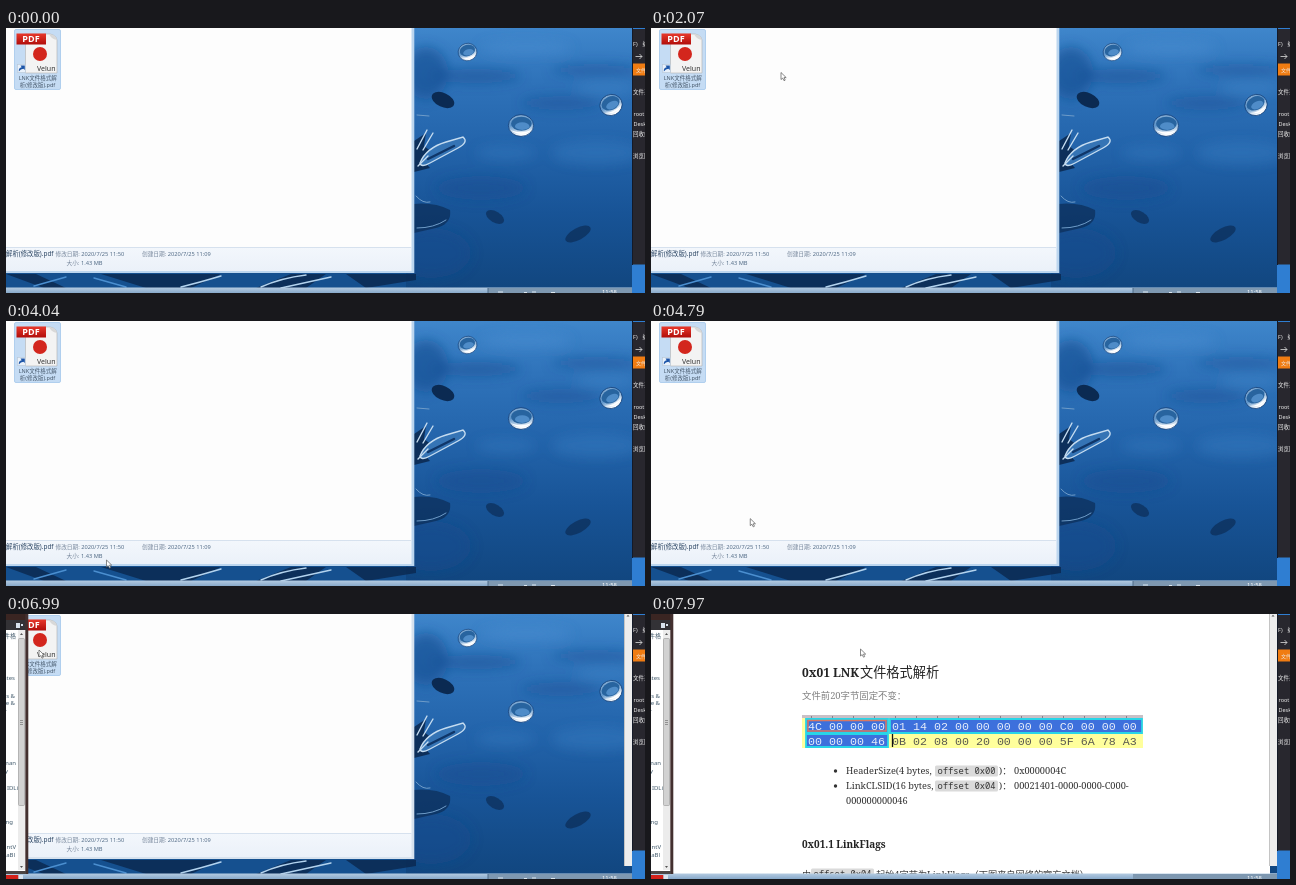
An HTML page that plays this animation: 639 px wide and 265 px high, repeating every 8000 ms.

```html
<!DOCTYPE html>
<html lang="zh-CN">
<head>
<meta charset="utf-8">
<style>
  html, body { margin: 0; width: 100%; height: 100%; overflow: hidden; background: #0c3a78 }
  svg { display: block; font-family: "Noto Sans", "Noto Sans CJK SC", "Noto Sans CJK", sans-serif }
  .serif { font-family: "Noto Serif", "Noto Sans CJK SC", "Noto Sans CJK", serif }
  .mono { font-family: "Noto Sans Mono", "DejaVu Sans Mono", monospace }
  .hex { font: 11.67px "Liberation Mono", monospace; white-space: pre }
</style>
</head>
<body>
<svg width="639" height="265" viewBox="0 0 639 265">
  <defs>
    <linearGradient id="sea" x2="0" y2="1">
      <stop offset="0" stop-color="#3f86cb"/><stop offset=".2" stop-color="#2f73ba"/>
      <stop offset=".45" stop-color="#2364ab"/><stop offset=".7" stop-color="#185497"/><stop offset="1" stop-color="#11467f"/>
    </linearGradient>
    <linearGradient id="drop" x2=".2" y2="1">
      <stop stop-color="#8fb2d4"/><stop offset=".5" stop-color="#5c93c9"/><stop offset="1" stop-color="#fff"/>
    </linearGradient>
    <linearGradient id="pane" x2="0" y2="1">
      <stop stop-color="#f3f7fc"/><stop offset="1" stop-color="#ebf1f9"/>
    </linearGradient>
    <linearGradient id="bar" x2="0" y2="1">
      <stop stop-color="#b5cce2"/><stop offset="1" stop-color="#88a9ca"/>
    </linearGradient>
    <linearGradient id="red" x2="0" y2="1">
      <stop stop-color="#e8392c"/><stop offset="1" stop-color="#b10d0a"/>
    </linearGradient>
    <filter id="soft" x="-50%" y="-80%" width="200%" height="260%"><feGaussianBlur stdDeviation="6"/></filter>
    <filter id="dim"><feGaussianBlur stdDeviation=".7"/></filter>
    <g id="bead">
      <ellipse rx="10.5" ry="9.7" fill="url(#drop)" stroke="#123f78" stroke-width=".7"/>
      <ellipse cx=".3" cy="-1.6" rx="8.6" ry="6.3" fill="#28649f"/>
      <ellipse cx="1" cy=".6" rx="6" ry="3.4" fill="#4f8cc8"/>
      <path d="M-9 4Q0 11 9 4Q0 8-9 4" fill="#fff"/>
    </g>
  </defs>

  <!-- desktop -->
  <rect width="639" height="265" fill="#15508f"/>
  <rect x="400" width="227" height="262" fill="url(#sea)"/>
  <g filter="url(#soft)">
    <g fill="#144b90">
      <ellipse cx="420" cy="45" rx="22" ry="26" opacity=".6"/>
      <ellipse cx="470" cy="48" rx="45" ry="7" opacity=".5"/>
      <ellipse cx="590" cy="42" rx="45" ry="6" opacity=".45"/>
      <ellipse cx="555" cy="75" rx="40" ry="7" opacity=".4"/>
      <ellipse cx="475" cy="160" rx="45" ry="12" opacity=".4"/>
      <ellipse cx="425" cy="225" rx="40" ry="25" opacity=".5"/>
    </g>
    <g fill="#4a90d2">
      <ellipse cx="520" cy="20" rx="45" ry="7" opacity=".5"/>
      <ellipse cx="600" cy="60" rx="30" ry="6" opacity=".35"/>
      <ellipse cx="590" cy="125" rx="45" ry="12" opacity=".25"/>
      <ellipse cx="500" cy="125" rx="30" ry="7" opacity=".25"/>
    </g>
  </g>
  <g fill="#0b2a52" filter="url(#dim)">
    <ellipse cx="437" cy="72" rx="12" ry="7" transform="rotate(25 437 72)"/>
    <ellipse cx="489" cy="189" rx="10" ry="5.5" transform="rotate(30 489 189)" opacity=".65"/>
    <ellipse cx="572" cy="206" rx="14" ry="6" transform="rotate(-28 572 206)" opacity=".65"/>
    <path d="M408 113L420 105L418 118L426 124L417 132L424 140L408 144Z" opacity=".9"/>
    <path d="M408 176Q428 174 444 182Q446 196 430 200L408 205Z" opacity=".65"/>
    <path d="M0 246L38 260H60L30 246ZM95 246L140 260H185L215 246ZM250 260L285 246H320L300 260ZM340 246H410V252L360 260Z" opacity=".85"/>
  </g>
  <g fill="none" stroke="#c5dcf0" stroke-width="1.4" stroke-linecap="round" filter="url(#dim)">
    <path d="M414 135Q420 120 440 114L457 109Q463 114 452 120L424 135Q415 140 414 135" fill="#3574b5"/>
    <path d="M422 131L448 118" stroke="#0f3668" stroke-width="2.5"/>
    <path d="M411 121L421 102M417 122L427 105M412 138L422 128"/>
    <path d="M410 168Q417 176 424 174M411 200Q428 200 440 192M411 87L423 88" stroke="#6f9cc8" stroke-width="1"/>
    <path d="M175 259Q195 254 215 248M255 259Q275 250 300 247M275 260L325 249" stroke="#b3d3ee"/>
    <path d="M28 258L60 249M88 250L120 259" stroke="#4b8fd0"/>
  </g>
  <use href="#bead" transform="translate(461.5 24) rotate(-15) scale(.9)"/>
  <use href="#bead" transform="translate(515 97.5) scale(1.2 1.12)"/>
  <use href="#bead" transform="translate(605 77) rotate(-25) scale(1.08)"/>

  <!-- taskbar -->
  <rect y="259.5" width="626" height="5.5" fill="url(#bar)"/>
  <path d="M482 260H626V265H482Z" fill="#7e98b1"/>
  <path d="M482 260V265" stroke="#4d6a88"/>
  <path d="M492 264H497M518 264.5H521M526 264H530M545 264.5H549" stroke="#dce7f0"/>
  <text x="596" y="265.9" font-size="5.8" fill="#fff">11:58</text>

  <!-- file window -->
  <rect id="frame" x="-5" y="-5" width="413.3" height="250" fill="#bcd6ef"/>
  <rect width="405.5" height="219.5" fill="#fdfdfd"/>
  <rect y="219" width="405.5" height="24" fill="url(#pane)"/>
  <path d="M0 219.5H405.5" stroke="#d6e1ee"/>
  <g id="details" font-size="5.7" fill="#75859a">
    <text y="228" font-size="6.4" fill="#2b4563">解析(修改版).pdf</text>
    <text x="49.5" y="228">修改日期: <tspan fill="#526b86">2020/7/25 11:50</tspan></text>
    <text x="136" y="228">创建日期: <tspan fill="#526b86">2020/7/25 11:09</tspan></text>
    <text x="60.5" y="236.5">大小: <tspan fill="#526b86">1.43 MB</tspan></text>
  </g>
  <rect id="mark" x="8.5" y="1.5" width="46" height="60" rx="1.5" fill="#c5dcf4" stroke="#b0cfee"/>
  <path d="M19.5 6H44Q50 7 51 12V45H19.5Z" fill="#f3f3f3" stroke="#b0b0b0" stroke-width=".6"/>
  <path d="M43 6Q45 11 51 12Q50 7 43 6" fill="#d8d8d8"/>
  <rect x="10.5" y="5.5" width="29.5" height="11" fill="url(#red)"/>
  <text x="25" y="14.2" font-size="9" font-weight="700" fill="#fff" text-anchor="middle">PDF</text>
  <circle cx="34" cy="26" r="7" fill="#d3261d"/>
  <text x="31" y="42.5" font-size="7" fill="#333">Velun</text>
  <rect x="11.5" y="36.5" width="8" height="8" fill="#e9f1fa" stroke="#b8c6d6" stroke-width=".6"/>
  <path d="M12.8 43.5Q12.5 39.7 15.7 39.3L14.5 37.5H18.8V42L17.4 40.8Q14.8 41 12.8 43.5" fill="#1c55a8"/>
  <g font-size="5.5" fill="#46586b" text-anchor="middle">
    <text x="31.7" y="51.5">LNK文件格式解</text>
    <text x="31.5" y="59">析(修改版).pdf</text>
  </g>

  <!-- reader window -->
  <g id="reader">
    <g id="page">
      <rect x="22" width="597" height="260" fill="#fff"/>
      <g class="serif" fill="#333">
        <g font-weight="600" fill="#222">
          <text x="151" y="62.5" font-size="12">0x01 LNK</text>
          <text x="209" y="62.5" font-size="13.2" font-weight="400">文件格式解析</text>
          <text x="151" y="233.5" font-size="10">0x01.1 LinkFlags</text>
        </g>
        <text x="151" y="84.5" font-size="9.4" fill="#808080">文件前20字节固定不变：</text>
        <rect x="151" y="101" width="341" height="33" fill="#ffff9c"/>
        <path d="M151 102.5H492" stroke="#c9c0c6" stroke-width="3"/>
        <path d="M160 103H490" stroke="#8a7f88" stroke-width="2" stroke-dasharray="1 20"/>
        <g fill="#3d70dc" stroke="#28d5e8" stroke-width="1.8">
          <path d="M155 105H237V119H155ZM239 105H491V119H239ZM155 120H237V133H155Z"/>
          <path d="M157 106.5H235V117H157Z" stroke="#d97862" stroke-width="1.5"/>
        </g>
        <g class="hex" fill="#e6edfa">
          <text x="157" y="116">4C 00 00 00 01 14 02 00 00 00 00 00 C0 00 00 00</text>
          <text x="157" y="130.5">00 00 00 46 <tspan fill="#5a5a50">0B 02 08 00 20 00 00 00 5F 6A 78 A3</tspan></text>
        </g>
        <path d="M241.5 120V133" stroke="#111" stroke-width="1.3"/>
        <g fill="#dadada">
          <rect x="284" y="151.5" width="63" height="11" rx="1.5"/>
          <rect x="284" y="166.5" width="63" height="11" rx="1.5"/>
          <rect x="160" y="254.5" width="63" height="11" rx="1.5"/>
        </g>
        <circle cx="184.5" cy="157" r="1.7"/><circle cx="184.5" cy="172" r="1.7"/>
        <g font-size="9.2">
          <text x="195" y="160.3">HeaderSize(4 bytes,</text>
          <text x="195" y="175.3">LinkCLSID(16 bytes,</text>
          <text x="348" y="160.3">)：</text><text x="363" y="160.3">0x0000004C</text>
          <text x="348" y="175.3">)：</text><text x="363" y="175.3">00021401-0000-0000-C000-</text>
          <text x="195" y="190.3">000000000046</text>
          <text x="151" y="263.5">由</text>
          <text x="225" y="263.5">起始4字节为LinkFlags（下图来自网络的官方文档）</text>
        </g>
        <g class="mono" font-size="8.8">
          <text x="286.5" y="160">offset 0x00</text>
          <text x="286.5" y="175">offset 0x04</text>
          <text x="162.5" y="263">offset 0x04</text>
        </g>
      </g>
      <rect x="22" y="259.5" width="604" height="5.5" fill="url(#bar)"/>
      <path d="M482 260H626V265H482Z" fill="#7e98b1"/>
      <text x="596" y="265.9" font-size="5.8" fill="#fff">11:58</text>
    </g>
    <rect width="20" height="260" fill="#fff"/>
    <rect width="22" height="16" fill="#333236"/>
    <rect width="22" height="6" fill="#3a2522"/>
    <path d="M10 9H14V14H10ZM15 10H17V12H15Z" fill="#d8e2ec"/>
    <g id="outline" font-size="6" fill="#41596b"></g>
    <rect x="12" y="16" width="7" height="240" fill="#ececec"/>
    <rect x="12.5" y="24.5" width="6" height="167" rx="1" fill="#d2d2d2" stroke="#a2a2a2" stroke-width=".7"/>
    <path d="M14 106.5H17M14 108.5H17M14 110.5H17" stroke="#777" stroke-width=".7"/>
    <path d="M14 21L15.5 19L17 21ZM14 252L15.5 254L17 252Z" fill="#555"/>
    <rect x="19.3" width="3" height="260" fill="#43302f"/>
    <rect y="257" width="20" height="3" fill="#4b4544"/>
    <rect x="618" width="8" height="252" fill="#ededed"/>
    <path d="M618.5 0V252" stroke="#c4c4c4"/>
    <path d="M620.5 2.5L622 .8L623.5 2.5Z" fill="#555"/>
    <rect y="261" width="12.5" height="4" fill="#d3211a"/>
    <rect x="12.5" y="261" width="4.5" height="4" fill="#d9e4ee"/>
  </g>

  <!-- neighbouring screen -->
  <rect x="626" width="13" height="265" fill="#2f7ed2"/>
  <rect x="626" y="1" width="13" height="235.5" fill="#28272e"/>
  <rect x="627" y="35.5" width="12" height="12" fill="#f07c12"/>
  <path d="M626.5 0V237" stroke="#141a28"/>
  <path d="M629.5 28.5H636M633.5 26L636 28.5L633.5 31" stroke="#ddd" fill="none" stroke-width=".8"/>
  <g font-size="5.5" fill="#eee">
    <text x="627" y="18">F)</text><text x="636.5" y="18">编</text>
    <text x="630" y="43.5" font-size="5">文件</text>
    <text x="627" y="66">文件系统</text><text x="627.5" y="87.5">root</text>
    <text x="627.5" y="98">Desktop</text><text x="627" y="108">回收站</text>
    <text x="627" y="129.5">浏览网络</text>
  </g>

  <path id="cursor" d="M0 0V7L1.7 5.6L3 8.2L4.2 7.6L3 5.1H5.2Z" fill="#fff" stroke="#555" stroke-width=".7"/>
</svg>
<script>
const $ = id => document.getElementById(id);
const LOOP = 8000;

// time, x, y of the pointer
const path = [
  [200, 541, 268], [860, 33, 33], [1000, 36, 44], [1050, 36, 44], [1280, 93, 66], [1510, 36, 44],
  [1820, 36, 44], [2070, 130, 44.5], [2480, 130, 44.5], [2790, 36, 38], [2990, 36, 38],
  [3450, 122, 150], [3780, 101, 234], [3830, 101, 234], [4040, 100.5, 239], [4180, 70, 230],
  [4320, 88, 215], [4460, 106, 232], [4600, 90, 224], [4650, 90, 224], [5000, 116, 150],
  [5450, 35, 42], [5500, 35, 42], [5550, 33, 29], [5600, 33, 36], [7310, 33, 36],
  [7600, 110, 17], [7970, 209.5, 35]
];

// visible ends of the outline entries: text, right edge, baseline
const entries = [["件格", 10, 24], ["ates", 9, 66], ["ss &", 9, 84], ["e &", 9, 91], ["-", 1, 98],
  ["man", 10, 151], ["y", 2, 159], ["IDLi", 12, 176], ["ing", 7, 210], ["ntV", 10, 235], ["aBl", 9, 243]];
for (const [label, x, y] of entries) {
  const el = document.createElementNS("http://www.w3.org/2000/svg", "text");
  el.setAttribute("x", x);
  el.setAttribute("y", y);
  el.setAttribute("text-anchor", "end");
  el.textContent = label;
  $("outline").append(el);
}

const ramp = (t, a, b) => Math.min(1, Math.max(0, (t - a) / (b - a)));
const mix = (a, b, k) => a + (b - a) * k;

function pointer(t) {
  const i = path.findIndex(p => p[0] > t);
  if (i < 0) return path[path.length - 1].slice(1);
  if (i === 0) return path[0].slice(1);
  const [a, b] = [path[i - 1], path[i]];
  const k = ramp(t, a[0], b[0]), ease = k * k * (3 - 2 * k);
  return [mix(a[1], b[1], ease), mix(a[2], b[2], ease)];
}

function draw(now) {
  const t = now % LOOP;
  const [x, y] = pointer(t);
  $("cursor").setAttribute("transform", `translate(${x} ${y})`);

  const selected = t < 2300 || t >= 2840;
  $("details").style.opacity = selected ? 1 : 0;
  $("mark").style.opacity = selected ? 1 : x < 55 ? .45 : 0;

  const idle = ramp(t, 6150, 6270);
  $("frame").setAttribute("fill", `rgb(${mix(188, 215, idle)},${mix(214, 226, idle)},${mix(239, 238, idle)})`);

  const open = ramp(t, 6760, 6960), size = mix(.94, 1, open);
  $("reader").style.opacity = open;
  $("reader").setAttribute("transform", `translate(${313 * (1 - size)} ${130 * (1 - size)}) scale(${size})`);
  $("page").style.opacity = t >= 7030 ? 1 : 0;
  requestAnimationFrame(draw);
}
requestAnimationFrame(draw);
</script>
</body>
</html>
```
